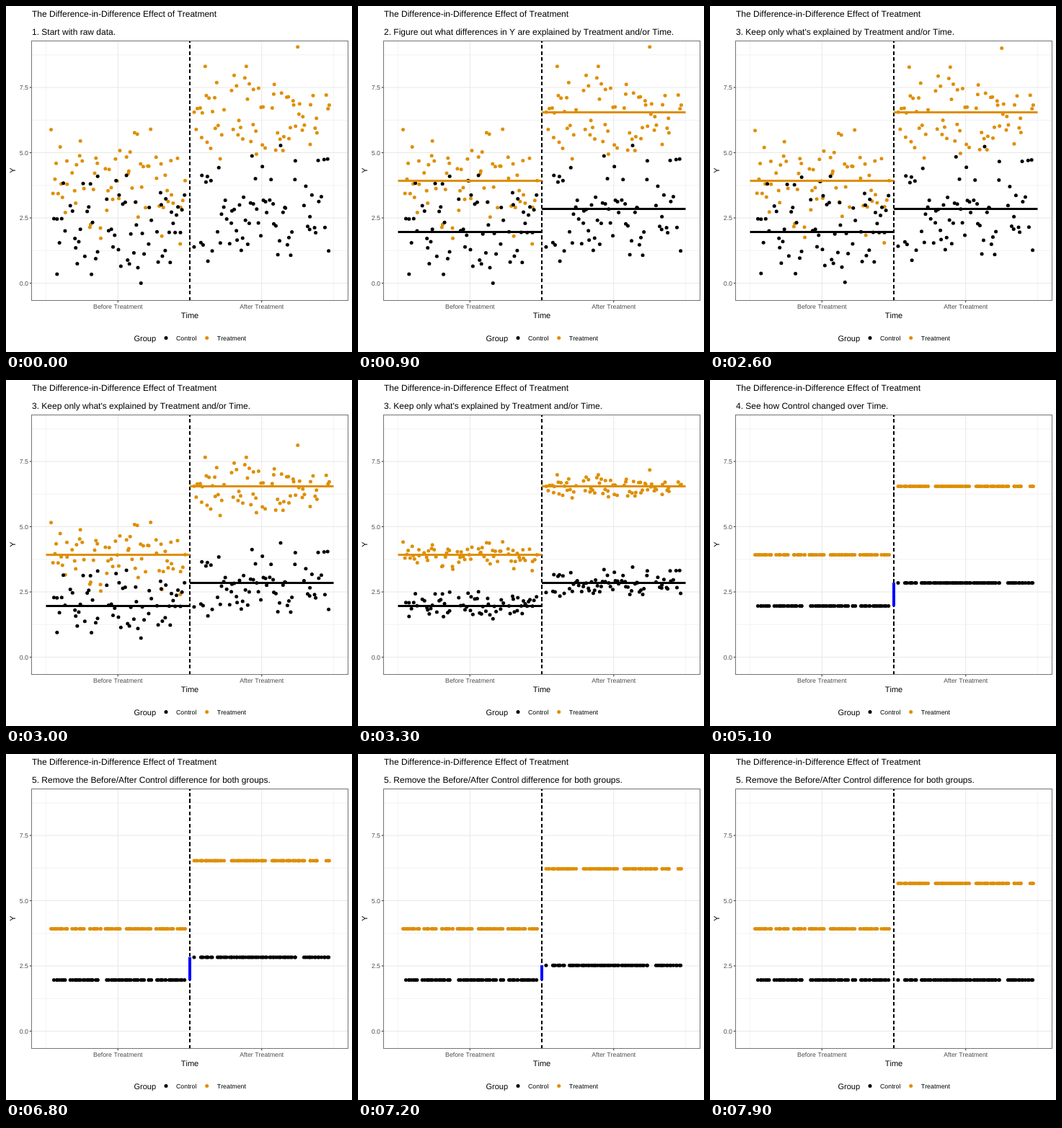
Animation, 480 px wide and 480 px high, one loop 8000 ms. Source, as an HTML page:

```html
<!DOCTYPE html>
<html lang="en">
<head>
<meta charset="utf-8">
<title>Difference in differences</title>
<style>
  html, body { margin: 0; width: 100%; height: 100%; overflow: hidden; background: #fff; }
  svg { display: block; width: 480px; height: 480px; }
  text { font-family: "Liberation Sans", Arial, sans-serif; font-kerning: none; text-rendering: geometricPrecision; }
</style>
</head>
<body>
<svg id="plot" viewBox="0 0 480 480"></svg>
<script>
const BLACK = '#000', ORANGE = '#de8f05', BLUE = '#00f', GRID = '#e8e8e8';
const LOOP = 8000, STEP = 100, STEPS = 12;
const LEFT = 35.5, RIGHT = 474.5, TOP = 48.5, BOTTOM = 408.5, MID = 255;
const plot = document.getElementById('plot');

function add(parent, tag, attrs, content = '') {
  const el = document.createElementNS('http://www.w3.org/2000/svg', tag);
  for (const key in attrs) el.setAttribute(key, attrs[key]);
  el.textContent = content;
  parent.appendChild(el);
  return el;
}
const line = (x1, y1, x2, y2, stroke, width, more = {}) =>
  add(plot, 'line', { x1, y1, x2, y2, stroke, 'stroke-width': width, ...more });
const label = (x, y, size, content, more = {}) =>
  add(plot, 'text', { x, y, 'font-size': size, ...more }, content);
const dot = (parent, cx, cy, fill) => add(parent, 'circle', { cx, cy, r: 2.5, fill });

const toX = v => MID + (v - 1.5) * 199.5;
const toY = v => 384.5 - v * 36.2;

// Panel, grid and axes
for (const v of [1.25, 3.75, 6.25, 8.75]) line(LEFT, toY(v), RIGHT, toY(v), GRID, 0.53);
for (const v of [0.5, 2.5]) line(toX(v), TOP, toX(v), BOTTOM, GRID, 0.53);
for (const v of [0, 2.5, 5, 7.5]) {
  line(LEFT, toY(v), RIGHT, toY(v), GRID, 1.07);
  line(LEFT - 2.7, toY(v), LEFT, toY(v), '#333', 1.07);
  label(31, toY(v) + 3.1, 8.8, v.toFixed(1), { fill: '#4d4d4d', 'text-anchor': 'end' });
}
['Before Treatment', 'After Treatment'].forEach((name, i) => {
  const x = toX(i + 1);
  line(x, TOP, x, BOTTOM, GRID, 1.07);
  line(x, BOTTOM, x, BOTTOM + 2.7, '#333', 1.07);
  label(x, 420, 8.8, name, { fill: '#4d4d4d', 'text-anchor': 'middle' });
});
const dots = add(plot, 'g', {});
line(MID, 409, MID, TOP, BLACK, 2, { 'stroke-dasharray': '5.3 3.23', 'shape-rendering': 'crispEdges' });
add(plot, 'rect', {
  x: LEFT, y: TOP, width: RIGHT - LEFT, height: BOTTOM - TOP, fill: 'none', stroke: '#737373'
});

label(36, 15, 12, 'The Difference-in-Difference Effect of Treatment');
const caption = label(36, 40, 12, '');
label(MID, 433, 11, 'Time', { 'text-anchor': 'middle' });
label(0, 0, 11, 'Y', { 'text-anchor': 'middle', transform: 'translate(13 228) rotate(-90)' });

// Legend
label(177.5, 465, 11, 'Group');
dot(plot, 222, 460.5, BLACK);
label(236, 464, 8.8, 'Control');
dot(plot, 278.7, 460.5, ORANGE);
label(292.8, 464, 8.8, 'Treatment');

let seed = 12;
function random() {
  seed = (seed * 1664525 + 1013904223) % 2 ** 32;
  return seed / 2 ** 32;
}
// Close to a standard normal, within three deviations
const noise = () => 2 * (random() + random() + random() - 1.5);

const CONTROL_Y = 313.5, SHIFT = 32, SPREAD = 36;
const points = [], means = [];

// Scatters points around a mean, spread along the given stretches of x
function series(count, color, mean, after, stretches) {
  const total = stretches.reduce((sum, [from, to]) => sum + to - from, 0);
  for (let i = 0; i < count; i++) {
    let rest = (i + random()) / count * total;
    const [from] = stretches.find(([a, b]) => rest <= b - a || (rest -= b - a, false));
    const y = mean + SPREAD * noise();
    points.push({ el: dot(dots, from + rest, y, color), y, mean, after });
  }
  const x = toX(after ? 1.5 : 0.5);
  means.push(line(x, mean, x + 199.5, mean, color, 3));
}
series(70, ORANGE, 242.5, false,
  [[62, 86], [90, 109], [115, 133], [136, 161], [167, 201], [206, 233], [237, 249]]);
series(66, BLACK, CONTROL_Y, false, [[66, 82], [88, 129], [139, 192], [196, 204], [208, 248]]);
series(72, ORANGE, 147.5, true, [[261, 303], [312, 361], [368, 415], [419, 434], [444, 450]]);
series(72, BLACK, CONTROL_Y - SHIFT, true, [[259, 263], [270, 287], [292, 404], [413, 434], [436, 449]]);
const gap = line(MID, 0, MID, CONTROL_Y + 0.3, BLUE, 4);

const captions = [
  [0, '1. Start with raw data.'],
  [500, '2. Figure out what differences in Y are explained by Treatment and/or Time.'],
  [2600, "3. Keep only what's explained by Treatment and/or Time."],
  [4700, '4. See how Control changed over Time.'],
  [6800, '5. Remove the Before/After Control difference for both groups.']
];

// Sine ease over twelve steps; the first step shows at "start"
function ease(t, start) {
  const k = Math.min(Math.max((t - start) / STEP + 1, 0), STEPS) / STEPS;
  return (1 - Math.cos(Math.PI * k)) / 2;
}
const show = (el, on) => el.setAttribute('visibility', on ? 'visible' : 'hidden');

function draw(t) {
  const squeeze = ease(t, 2600), drop = ease(t, 6800) * SHIFT;
  caption.textContent = captions.filter(([start]) => t >= start).pop()[1];
  for (const p of points) {
    p.el.setAttribute('cy', p.y + (p.mean - p.y) * squeeze + (p.after ? drop : 0));
  }
  for (const m of means) show(m, t >= 900 && t < 4700);
  gap.setAttribute('y1', CONTROL_Y - SHIFT + drop - 0.3);
  show(gap, t >= 5100 && drop < SHIFT - 0.01);
}

let begin, last = -1;
function tick(now) {
  begin ??= now;
  const t = Math.floor(((now - begin) % LOOP) / STEP) * STEP;
  if (t !== last) draw(last = t);
  requestAnimationFrame(tick);
}
draw(0);
requestAnimationFrame(tick);
</script>
</body>
</html>
```
